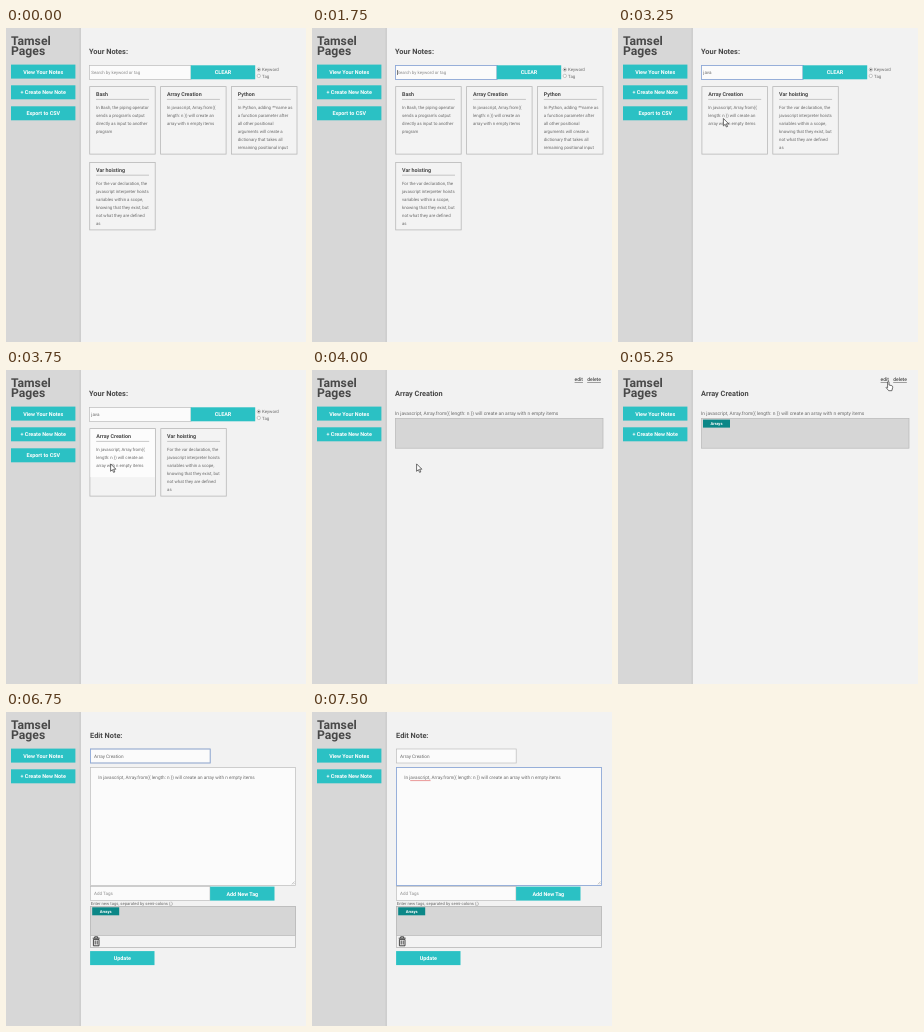
An HTML page that plays this animation: 300x314 px, repeating every 8 s.

```html
<!DOCTYPE html>
<html lang="en">
<head>
<meta charset="utf-8">
<title>Notes app</title>
<style>
  html, body { margin: 0; width: 100%; height: 100%; overflow: hidden; background: #f2f2f2; }
  svg { display: block; width: 300px; height: 314px; font-family: Roboto, sans-serif; text-rendering: geometricPrecision; }
  .bold { font-weight: 700; }
  .dark { fill: #484848; }
  .body { fill: #6a6a6a; }
  .hint { fill: #8a8a8a; }
  .white { fill: #fff; }
  .mid { text-anchor: middle; }
  .page { fill: #f2f2f2; }
  .side { fill: #d7d7d7; }
  .button { fill: #2bc1c4; }
  .tag { fill: #0b8787; }
  .field { fill: #fbfbfb; stroke: #bcbcbc; stroke-width: .7; }
  .focus { fill: none; stroke: #8ba9dc; stroke-width: .8; }
  .card { fill: #f3f3f3; stroke: #b8b8b8; stroke-width: .8; }
  .hover { fill: #fcfcfc; }
  .box { fill: #d6d6d6; stroke: #b8b8b8; stroke-width: .7; }
  .line { stroke: #a6a6a6; stroke-width: .6; fill: none; }
  .caret { stroke: #333; stroke-width: .6; }
  .link { font-weight: 500; text-decoration: underline; }
  .trash { fill: none; stroke: #333; stroke-width: .9; }
  .spell { stroke: #e27070; stroke-width: .7; }
  .cursor { fill: #fff; stroke: #333; stroke-width: .7; stroke-linejoin: round; }
</style>
</head>
<body>
<svg id="stage" viewBox="0 0 300 314"></svg>
<script>
const LOOP = 8000;
const SNIPPET = 'In javascript, Array.from({ length: n }) will create an array with n empty items';

const text = (x, y, size, cls, str) =>
  `<text x="${x}" y="${y}" font-size="${size}" class="${cls}">${str}</text>`;
const rect = (x, y, w, h, cls) =>
  `<rect x="${x}" y="${y}" width="${w}" height="${h}" class="${cls}"/>`;
const path = (d, cls) => `<path d="${d}" class="${cls}"/>`;
const caret = (x, y) => path(`M${x} ${y}v5`, 'caret');
const at = (x, y, shape) => `<g transform="translate(${x} ${y})">${shape}</g>`;
// spans: pairs of [from, to) in ms
const show = (spans, ...parts) => `<g data-spans="${spans}">${parts.join('')}</g>`;

const button = (x, y, label) =>
  rect(x, y, 64.4, 14, 'button') + text(x + 32.2, y + 9, 5.4, 'bold white mid', label);

const tag = (x, y) =>
  rect(x, y, 27, 8, 'tag') + text(x + 13.5, y + 5.5, 4.1, 'bold white mid', 'Arrays');

const card = (x, y, title, lines, extra = '') =>
  rect(x, y, 65.5, 67.5, 'card') + extra +
  text(x + 6.3, y + 9.3, 5.36, 'bold dark', title) +
  path(`M${x + 6.3} ${y + 12.8}h53`, 'line') +
  lines.map((s, i) => text(x + 6.3, y + 22.2 + i * 8.1, 4.35, 'body', s)).join('');

const radio = (y, label, on) =>
  `<circle cx="252.8" cy="${y}" r="1.7" fill="#fafafa" stroke="#999" stroke-width=".5"/>` +
  (on ? `<circle cx="252.8" cy="${y}" r=".9" fill="#555"/>` : '') +
  text(256, y + 1.7, 4.4, 'body', label);

const arrow = path('M0 0v7.4l1.8-1.6 1.2 2.7 1.2-.5-1.2-2.7h2.3z', 'cursor');
const hand = path('M2.2 .9q.7-.9 1.4 0v3.2l2.9.7q1 .4.8 1.6l-.8 3.4h-3.2L.7 6.7q0-.9 1.5.2z', 'cursor');

const trash =
  path('M86.7 226.2h7M88.7 226v-1.2h3V226', 'trash') +
  path('M87.4 227.4h5.6v6.4h-5.6zM89.2 228.5v4M91.2 228.5v4', 'trash');

const arrays = ['In javascript, Array.from({', 'length: n }) will create an', 'array with n empty items'];
const hoist = ['For the var declaration, the', 'javascript interpreter hoists', 'variables within a scope,',
  'knowing that they exist, but', 'not what they are defined', 'as'];
const bash = ['In Bash, the piping operator', "sends a program's output", 'directly as input to another', 'program'];
const python = ['In Python, adding **name as', 'a function parameter after', 'all other positional',
  'arguments will create a', 'dictionary that takes all', 'remaining positional input'];

const sidebar =
  rect(0, 0, 74, 314, 'side') + path('M74.3 0v314', 'line') +
  text(5, 17, 12.2, 'bold dark', 'Tamsel') + text(5, 27.2, 12.2, 'bold dark', 'Pages') +
  button(5, 36.6, 'View Your Notes') + button(5, 57.3, '+ Create New Note') +
  show('0 4000', button(5, 78.3, 'Export to CSV'));

const list = show('0 4000',
  text(83, 25.8, 7.4, 'bold dark', 'Your Notes:'),
  rect(83.5, 37.5, 101.5, 14, 'field'),
  show('750 3750', rect(83.5, 37.5, 101.5, 14, 'focus')),
  show('0 2250', text(85.3, 46, 4.4, 'hint', 'Search by keyword or tag')),
  show('2250 2500', text(85.3, 46, 4.6, 'body', 'ja'), caret(89.6, 42)),
  show('2500 4000', text(85.3, 46, 4.6, 'body', 'java')),
  show('750 1000 1750 2250', caret(85.5, 42)),
  show('2500 3000 3500 3750', caret(94.3, 42)),
  button(184.8, 37.3, 'CLEAR'),
  radio(41.6, 'Keyword', true), radio(47.9, 'Tag', false),
  show('0 2250',
    card(83.7, 58.6, 'Bash', bash), card(154.6, 58.6, 'Array Creation', arrays),
    card(225.5, 58.6, 'Python', python), card(83.7, 134.4, 'Var hoisting', hoist)),
  show('2250 4000',
    card(83.9, 58.6, 'Array Creation', arrays, show('3750 4000', rect(84.4, 59.1, 64.5, 48, 'hover'))),
    card(154.8, 58.6, 'Var hoisting', hoist)));

const detail = show('4000 6000',
  text(83, 25.8, 7.35, 'bold dark', 'Array Creation'),
  text(262.6, 11.4, 4.95, 'dark link', 'edit'), text(275.2, 11.4, 4.95, 'dark link', 'delete'),
  text(83, 45.2, 4.9, 'body', SNIPPET),
  rect(83.4, 48.4, 207.6, 29.8, 'box'),
  show('4250 6000', tag(85, 49.6)));

const editor = show('6000 8000',
  text(84.1, 25.8, 7.35, 'bold dark', 'Edit Note:'),
  rect(84.5, 37, 119.7, 14, 'field'),
  show('6000 7000', rect(84.5, 37, 119.7, 14, 'focus')),
  text(88, 45.6, 4.7, 'body', 'Array Creation'),
  show('6000 6500', caret(118.4, 41.4)),
  rect(84.5, 55.5, 205, 118, 'field'),
  show('7000 8000', rect(84.5, 55.5, 205, 118, 'focus'), path('M98.2 68.6h20.4', 'spell')),
  text(92.2, 67.4, 4.69, 'body', SNIPPET),
  path('M285.8 172.3l2.8-2.8M287.4 172.3l1.2-1.2', 'line'),
  rect(84.5, 174.6, 119.5, 14, 'field'), text(88, 183.4, 4.5, 'hint', 'Add Tags'),
  button(204.1, 174.6, 'Add New Tag'),
  text(84.8, 192.6, 4.2, 'body', 'Enter new tags, separated by semi-colons (;)'),
  rect(84.5, 194.5, 205, 41, 'card'), rect(84.5, 194.5, 205, 29, 'box'),
  tag(86.2, 195.3),
  show('6750 8000', trash),
  button(84.1, 239.1, 'Update'));

const pointer = [
  [3250, 3500, 105.4, 90.5, arrow], [3500, 4250, 104.6, 93.9, arrow],
  [4250, 4500, 212.5, 42, arrow], [4500, 4750, 269.5, 20, arrow],
  [4750, 5000, 268.3, 14.5, hand], [5000, 6250, 267.4, 10.9, hand],
  [6250, 6500, 247.5, 30, arrow]
].map(([from, to, x, y, shape]) => show(`${from} ${to}`, at(x, y, shape))).join('');

const stage = document.getElementById('stage');
stage.innerHTML = rect(0, 0, 300, 314, 'page') + sidebar + list + detail + editor + pointer;

const layers = [...stage.querySelectorAll('[data-spans]')].map(el => ({
  el, spans: el.dataset.spans.split(' ').map(Number)
}));

function draw(t) {
  for (const { el, spans } of layers) {
    const on = spans.some((from, i) => i % 2 === 0 && t >= from && t < spans[i + 1]);
    el.style.display = on ? '' : 'none';
  }
}

const start = performance.now();
function tick() {
  draw((performance.now() - start) % LOOP);
  requestAnimationFrame(tick);
}
tick();
</script>
</body>
</html>
```
